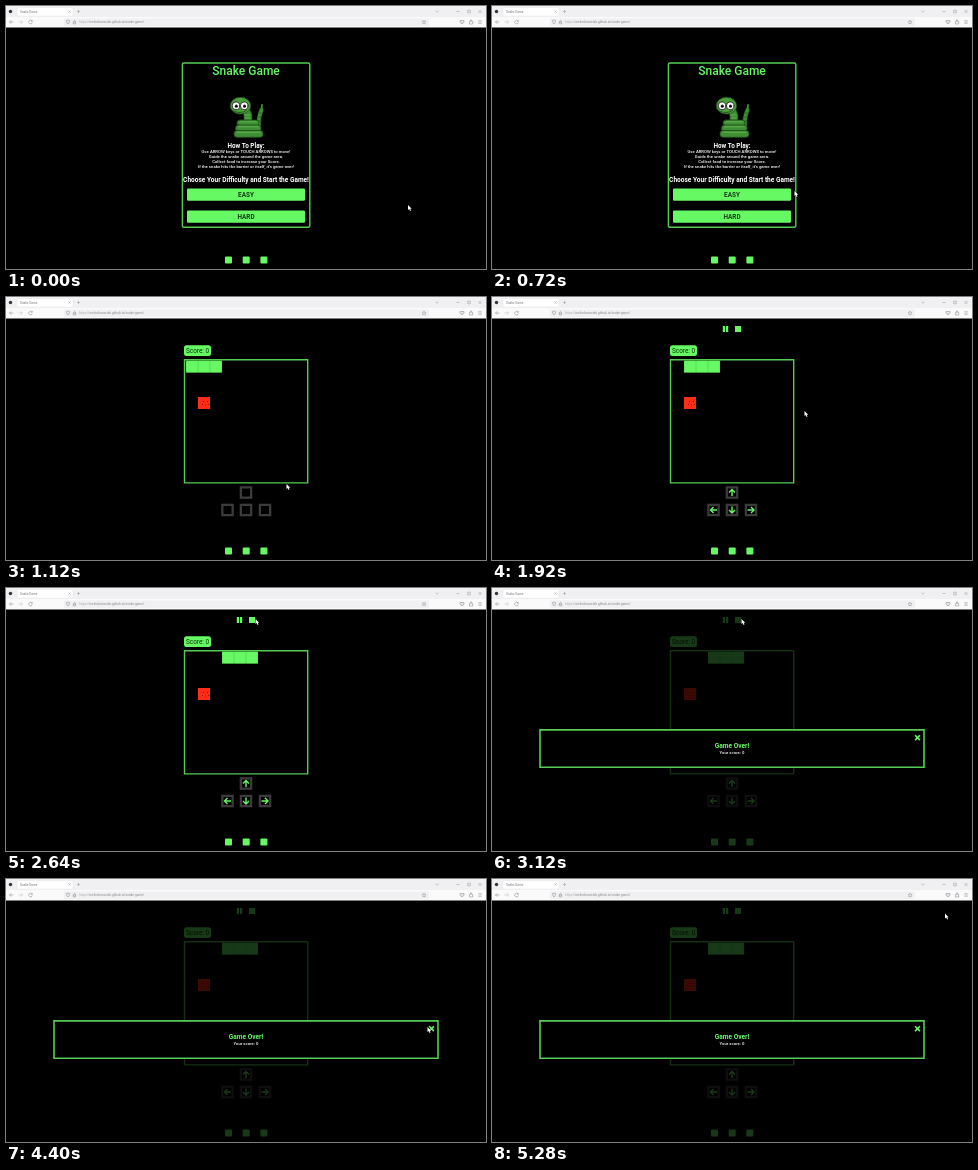
Write an HTML page with a canvas that moves like this. It is 480 px wide and 263 px high and loops after 5.76 s.

```html
<!DOCTYPE html>
<html lang="en">
<head>
<meta charset="utf-8">
<title>Snake Game</title>
<style>
html, body { margin: 0; width: 100%; height: 100%; overflow: hidden; background: #000; }
canvas { display: block; width: 480px; height: 263px; }
</style>
</head>
<body>
<canvas id="stage"></canvas>
<script>
const W = 480, H = 263, LOOP = 5760, STEP = 80;
const GREEN = '#66f964', BORDER = '#57cc52';
const canvas = document.getElementById('stage');
const ctx = canvas.getContext('2d');
const ratio = window.devicePixelRatio || 1;
canvas.width = W * ratio;
canvas.height = H * ratio;

const GAME_START = 960, FIRST_MOVE = 1520, MOVE_EVERY = 480, GAME_OVER = 2880;

// Pointer path: time, x, y
const path = [
  [0, 402, 199], [400, 352, 187], [720, 302.5, 185], [880, 280.5, 187],
  [1440, 280.5, 187], [1760, 325, 135], [2080, 300, 93], [2480, 249.5, 31],
  [3360, 249.5, 31], [3600, 228.5, 85.5], [4000, 411.5, 166],
  [4400, 421.5, 148], [4480, 421.5, 148], [4880, 473, 6], [5120, 468, 6],
  [5280, 453, 34.5], [LOOP, 453, 34.5]
];

function rect(x, y, w, h, color) {
  ctx.fillStyle = color;
  ctx.fillRect(x, y, w, h);
}

function paint(fill, stroke, width) {
  if (fill) { ctx.fillStyle = fill; ctx.fill(); }
  if (stroke) { ctx.strokeStyle = stroke; ctx.lineWidth = width; ctx.stroke(); }
}

function round(x, y, w, h, r, fill, stroke, width = 1.4) {
  ctx.beginPath();
  ctx.roundRect(x, y, w, h, r);
  paint(fill, stroke, width);
}

function ellipse(x, y, rx, ry, fill, stroke, width = 0.7) {
  ctx.beginPath();
  ctx.ellipse(x, y, rx, ry, 0, 0, Math.PI * 2);
  paint(fill, stroke, width);
}

// SVG path drawn as a line at an offset
function line(d, color, width = 0.7, x = 0, y = 0) {
  ctx.save();
  ctx.translate(x, y);
  ctx.strokeStyle = color;
  ctx.lineWidth = width;
  ctx.stroke(new Path2D(d));
  ctx.restore();
}

function text(str, x, y, size, color, weight = 400, align = 'center') {
  ctx.font = `${weight} ${size}px Roboto, sans-serif`;
  ctx.textAlign = align;
  ctx.fillStyle = color;
  ctx.fillText(str, x, y);
}

function drawBrowser() {
  const ink = '#909094';
  rect(0, 0, W, 11, '#f0f0f3');
  rect(0, 11, W, 10.5, '#fafafb');
  ellipse(4.5, 5.5, 1.7, 1.7, '#333');
  round(11, 1.5, 56, 8.5, 1, '#fff', '#e4e4e6', 0.5);
  text('Snake Game', 14, 7, 3.1, '#777', 400, 'left');
  line('M-1-1L1 1M1-1L-1 1', ink, 0.5, 63.5, 5.5);
  line('M-1.5 0H1.5M0-1.5V1.5', ink, 0.5, 72.5, 5.5);
  line('M-1.5-.7L0 .7L1.5-.7', ink, 0.5, 431, 5.5);
  line('M-1.5 0H1.5', ink, 0.5, 452, 5.5);
  line('M-1.3-1.3H1.3V1.3H-1.3Z', ink, 0.5, 463, 5.5);
  line('M-1.4-1.4L1.4 1.4M1.4-1.4L-1.4 1.4', ink, 0.5, 474, 5.5);

  line('M2 0H-2M-.3-1.7L-2 0L-.3 1.7', ink, 0.6, 5.5, 16);
  line('M-2 0H2M.3-1.7L2 0L.3 1.7', '#c4c4c6', 0.6, 14.5, 16);
  line('M1.5-1A1.8 1.8 0 1 0 1.8 .5M1.8-2V-.7H.5', ink, 0.6, 24.5, 16);
  round(58, 12.5, 365, 7.5, 1, '#f0f0f3');
  line('M-1.5-1.5L0-2L1.5-1.5Q1.5 1 0 2Q-1.5 1-1.5-1.5Z', ink, 0.6, 62, 16);
  line('M-1.2 0H1.2V1.8H-1.2ZM-.8 0V-1Q0-2.4 .8-1V0', ink, 0.6, 68.5, 16);
  text('https://', 73, 17.2, 3.2, '#aaa', 400, 'left');
  const left = 73 + ctx.measureText('https://').width;
  text('melindorvastek.github.io/snake-game/', left, 17.2, 3.2, '#888', 400, 'left');
  line('M0-2L.6-.6L2-.5L.9.5L1.2 1.9L0 1.1L-1.2 1.9L-.9.5L-2-.5L-.6-.6Z', ink, 0.5, 418, 16);
  line('M-2-1.5H2V0Q0 3.5-2 0ZM-1-.5L0 .5L1-.5', ink, 0.6, 456, 16);
  line('M-1.5-.5H-.5V-2H.7V-.5H1.7V2H-1.5Z', ink, 0.6, 465, 16);
  line('M-1.7-1.4H1.7M-1.7 0H1.7M-1.7 1.4H1.7', ink, 0.5, 474, 16);
}

function drawMascot() {
  const dark = '#1c4a1a', skin = '#3f8f35', pale = '#5fae4c';
  ctx.lineCap = 'round';
  line('M253 121Q252 112 255.5 104', dark, 4.6);
  line('M253 121Q252 112 255.5 104', skin, 3.4);
  line('M255.5 104L256 99', skin, 1.8);
  for (const y of [107, 111, 115]) line('M-1.2 0H1.2', dark, 0.6, 254, y);
  line('M239 104Q244 109 241 117', dark, 8.6);
  line('M239 104Q244 109 241 117', skin, 7.2);
  for (const y of [109, 112]) line('M-2.5 0H2.5', pale, 1, 241.5, y);

  // Stacked coils, the widest one in front
  for (const [x, y, w, h] of [[231, 114, 22, 6], [229.5, 119, 25.5, 6.5], [228, 124.5, 29, 6.8]]) {
    round(x, y, w, h, 3, skin, dark, 0.8);
    line(`M${x + 3} ${y + 1.8}H${x + w - 3}`, pale, 1);
  }

  ellipse(234.5, 99.7, 10.3, 8.4, '#4da03c', dark);
  line('M227.5 105Q234 108.5 240.5 104.5', dark, 0.8);
  for (const x of [230, 238.2]) {
    ellipse(x, 99.8, 3.8, 3.9, '#fff', '#111', 0.8);
    ellipse(x + 0.3, 100.2, 1.5, 1.6, '#111');
  }
  ctx.lineCap = 'butt';
}

function drawMenu() {
  round(176.4, 57, 127.4, 164.3, 1.5, null, BORDER);
  text('Snake Game', 240, 68.6, 12, GREEN, 500);
  drawMascot();
  text('How To Play:', 240, 141.6, 6.4, '#fff', 700);
  [
    'Use ARROW keys or TOUCH ARROWS to move!',
    'Guide the snake around the game area.',
    'Collect food to increase your Score.',
    "If the snake hits the barrier or itself, it's game over!"
  ].forEach((s, i) => text(s, 240, 147 + i * 5, 4.25, '#fff', 500));
  text('Choose Your Difficulty and Start the Game!', 240, 176.2, 6.55, '#fff', 700);
  ['EASY', 'HARD'].forEach((label, i) => {
    const y = 182.5 + i * 22;
    round(181, y, 118, 12.2, 1.2, GREEN);
    text(label, 240, y + 8.5, 6.4, '#143a14', 700);
  });
}

function drawPad(x, y, angle, ready) {
  ctx.save();
  ctx.translate(x, y);
  rect(-6.3, -6.3, 12.6, 12.6, '#3b3b3b');
  rect(-4, -4, 8, 8, '#000');
  if (ready) {
    ctx.rotate(angle);
    line('M0 3.5V-3M-3 0L0-3L3 0', GREEN, 1.4);
  }
  ctx.restore();
}

function drawGame(t) {
  const moves = t < FIRST_MOVE ? 0 : Math.min(3, 1 + Math.floor((t - FIRST_MOVE) / MOVE_EVERY));
  const ready = t >= FIRST_MOVE + STEP;
  round(178, 48.3, 27, 10.6, 2.5, GREEN);
  text('Score: 0', 191.5, 56, 6.4, '#0c300c');
  round(178.5, 62.7, 123.2, 123.2, 0, null, BORDER);
  for (let i = 0; i < 3; i++) {
    const x = 180 + (moves + i) * 12;
    rect(x, 63.6, 12, 12, '#4fc84d');
    rect(x + 0.3, 63.9, 11.4, 11.4, GREEN);
  }
  rect(192, 100, 12, 12, '#ff2d16');
  for (const [x, y] of [[197, 104], [201, 104], [196, 107], [199, 107.5], [202, 107]])
    rect(x, y, 1, 1, '#8c1208');
  drawPad(240, 195.5, 0, ready);
  drawPad(221.5, 213, -Math.PI / 2, ready);
  drawPad(240, 213, Math.PI, ready);
  drawPad(259, 213, Math.PI / 2, ready);
  if (ready) {
    rect(230.8, 29, 2.2, 6, GREEN);
    rect(234, 29, 2.2, 6, GREEN);
    rect(243, 29, 6, 6, GREEN);
  }
}

function drawDialog() {
  rect(0, 21.5, W, H, 'rgba(0,0,0,.77)');
  round(48, 141.9, 384, 37.4, 0, '#000', BORDER, 1.6);
  text('Game Over!', 240, 160.3, 6.6, GREEN, 700);
  text('Your score: 0', 240, 166, 4.25, '#fff', 500);
  line('M-2.4-2.4L2.4 2.4M2.4-2.4L-2.4 2.4', GREEN, 1.6, 425.5, 149.7);
}

function drawPointer(t) {
  const i = path.findIndex(p => p[0] > t);
  const [t0, x0, y0] = path[i - 1], [t1, x1, y1] = path[i];
  const k = (t - t0) / (t1 - t0);
  ctx.save();
  ctx.translate(x0 + (x1 - x0) * k, y0 + (y1 - y0) * k);
  const arrow = new Path2D('M0 0V5L1.2 4L2.1 6L3 5.6L2.2 3.7H3.7Z');
  ctx.strokeStyle = '#000';
  ctx.lineWidth = 0.7;
  ctx.stroke(arrow);
  ctx.fillStyle = '#fff';
  ctx.fill(arrow);
  ctx.restore();
}

function draw(now) {
  const t = Math.floor((now % LOOP) / STEP) * STEP;
  ctx.setTransform(ratio, 0, 0, ratio, 0, 0);
  rect(0, 0, W, H, '#000');
  if (t < GAME_START) drawMenu();
  else drawGame(t);
  for (const x of [219, 236.7, 254.4]) round(x, 250.5, 7, 7, 1, GREEN);
  if (t >= GAME_OVER) drawDialog();
  drawBrowser();
  drawPointer(t);
}

const start = performance.now();
function tick() {
  draw(performance.now() - start);
  requestAnimationFrame(tick);
}
tick();
</script>
</body>
</html>
```
